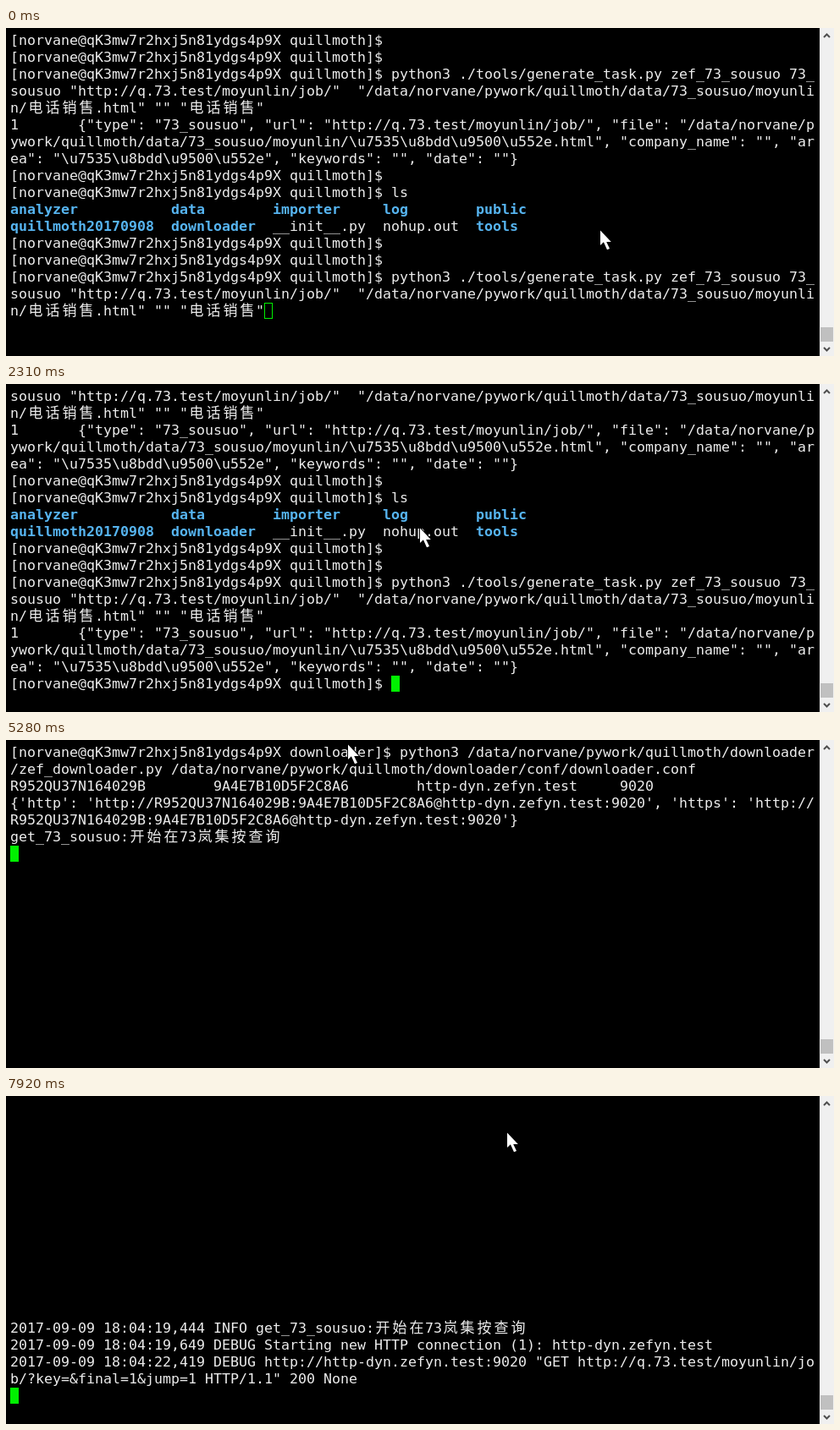
Write an HTML page with a canvas that moves like this. It is 978 by 388 pixels and loops after 8 s.

```html
<!DOCTYPE html>
<html lang="en">
<head>
<meta charset="utf-8">
<title>Terminal session</title>
<style>
html, body { margin: 0; width: 100%; height: 100%; overflow: hidden; background: #000; }
canvas { display: block; }
</style>
</head>
<body>
<canvas id="stage" width="978" height="388"></canvas>
<script>
const ctx = document.getElementById('stage').getContext('2d', { alpha: false });
const LOOP = 8000, COLS = 95, CELL = 10, ROW = 20, PAD = 5;
const MONO = '16.6px "DejaVu Sans Mono", monospace';
const CJK = '300 17px "Noto Sans CJK SC", "Noto Sans CJK", sans-serif';
const TEXT = '#ececec', BLUE = '#56b4f0', GREEN = '#00f000';

const home = '/data/norvane/pywork/quillmoth';
const url = 'http://q.73.test/moyunlin/job/';
const proxy = 'http-dyn.zefyn.test';
const id = 'R952QU37N164029B', key = '9A4E7B10D5F2C8A6';
const login = `http://${id}:${key}@${proxy}:9020`;
const codes = String.raw`\u7535\u8bdd\u9500\u552e`;
const notice = 'get_73_sousuo:开始在73岚集按查询';
const prompt = dir => `[norvane@qK3mw7r2hxj5n81ydgs4p9X ${dir}]$ `;
const ps = prompt('quillmoth');

const generate = `${ps}python3 ./tools/generate_task.py zef_73_sousuo 73_sousuo "${url}"  ` +
  `"${home}/data/73_sousuo/moyunlin/电话销售.html" "" "电话销售"`;
const task = `1       {"type": "73_sousuo", "url": "${url}", ` +
  `"file": "${home}/data/73_sousuo/moyunlin/${codes}.html", ` +
  `"company_name": "", "area": "${codes}", "keywords": "", "date": ""}`;
// An asterisk switches bold blue on and off.
const before = [
  ps, ps, generate, task, ps, ps + 'ls',
  '*analyzer           data        importer     log        public*',
  '*quillmoth20170908  downloader*  __init__.py  nohup.out  *tools*',
  ps, ps, generate
];
const download = `${prompt('downloader')}python3 ${home}/downloader/zef_downloader.py ` +
  `${home}/downloader/conf/downloader.conf`;
const started = [
  download,
  [id, key, proxy].map(s => s.padEnd(24)).join('') + '9020',
  `{'http': '${login}', 'https': '${login}'}`,
  notice, ''
];
const log = [
  '2017-09-09 18:04:19,444 INFO ' + notice,
  `2017-09-09 18:04:19,649 DEBUG Starting new HTTP connection (1): ${proxy}`
];
const reply = `2017-09-09 18:04:22,419 DEBUG http://${proxy}:9020 ` +
  `"GET ${url}?key=&final=1&jump=1 HTTP/1.1" 200 None`;

// [start time, lines, first row]
const screens = [
  [0, before, 0],
  [990, [...before, task, ps], -3],
  [3630, [download], 0],
  [3960, started, 0],
  [6930, [...log, ''], 15],
  [7920, [...log, reply, ''], 13]
];
// [start time, x, y]
const pointer = [
  [0, 702, 240], [330, 413, 280], [2310, 489, 171], [2970, 288, 3],
  [3300, 339, -8], [5280, 404, 6], [6270, 513, 16], [6600, 479, -8],
  [7260, 555, 121], [7920, 592, 44]
];
const arrow = new Path2D('M0 -0.5V17L3.9 13.3L8 22.3L11 21L7.2 13H12.8Z');
const at = (list, t) => list.findLast(step => step[0] <= t);

function drawLines(lines, top) {
  let row = top, col = 0;
  lines.forEach((line, i) => {
    if (i) row++;
    col = 0;
    let bold = false;
    for (const ch of line) {
      if (ch === '*') { bold = !bold; continue; }
      const wide = ch > '\u2e7f', span = wide ? 2 : 1;
      if (col + span > COLS) { col = 0; row++; }
      ctx.font = wide ? CJK : (bold ? 'bold ' : '') + MONO;
      ctx.fillStyle = bold ? BLUE : TEXT;
      if (row >= 0) ctx.fillText(ch, PAD + col * CELL + (wide ? 1.5 : 0), 20 + row * ROW);
      col += span;
    }
  });
  return [PAD + col * CELL, PAD + row * ROW];
}

function chevron(y, dir) {
  ctx.beginPath();
  ctx.moveTo(966, y + 2 * dir);
  ctx.lineTo(969.5, y - 1.5 * dir);
  ctx.lineTo(973, y + 2 * dir);
  ctx.stroke();
}

function drawScrollbar() {
  ctx.fillStyle = '#f0f0f0';
  ctx.fillRect(961, 0, 17, 388);
  ctx.fillStyle = '#c0c0c0';
  ctx.fillRect(962, 354, 15, 17);
  ctx.strokeStyle = '#505050';
  ctx.lineWidth = 2;
  chevron(9, 1);
  chevron(380, -1);
}

function drawPointer(x, y) {
  ctx.save();
  ctx.translate(x, y);
  ctx.strokeStyle = '#000';
  ctx.lineWidth = 2;
  ctx.stroke(arrow);
  ctx.fillStyle = '#fff';
  ctx.fill(arrow);
  ctx.restore();
}

function draw(t) {
  ctx.fillStyle = '#000';
  ctx.fillRect(0, 0, 978, 388);
  const [, lines, top] = at(screens, t);
  const [x, y] = drawLines(lines, top);
  ctx.fillStyle = ctx.strokeStyle = GREEN;
  ctx.lineWidth = 1;
  if (t < 660) ctx.strokeRect(x + 0.5, y + 0.5, 9, 18);
  else ctx.fillRect(x, y, 10, 19);
  drawScrollbar();
  const [, px, py] = at(pointer, t);
  drawPointer(px, py);
}

const start = performance.now();
function tick() {
  draw((performance.now() - start) % LOOP);
  requestAnimationFrame(tick);
}
tick();
</script>
</body>
</html>
```
